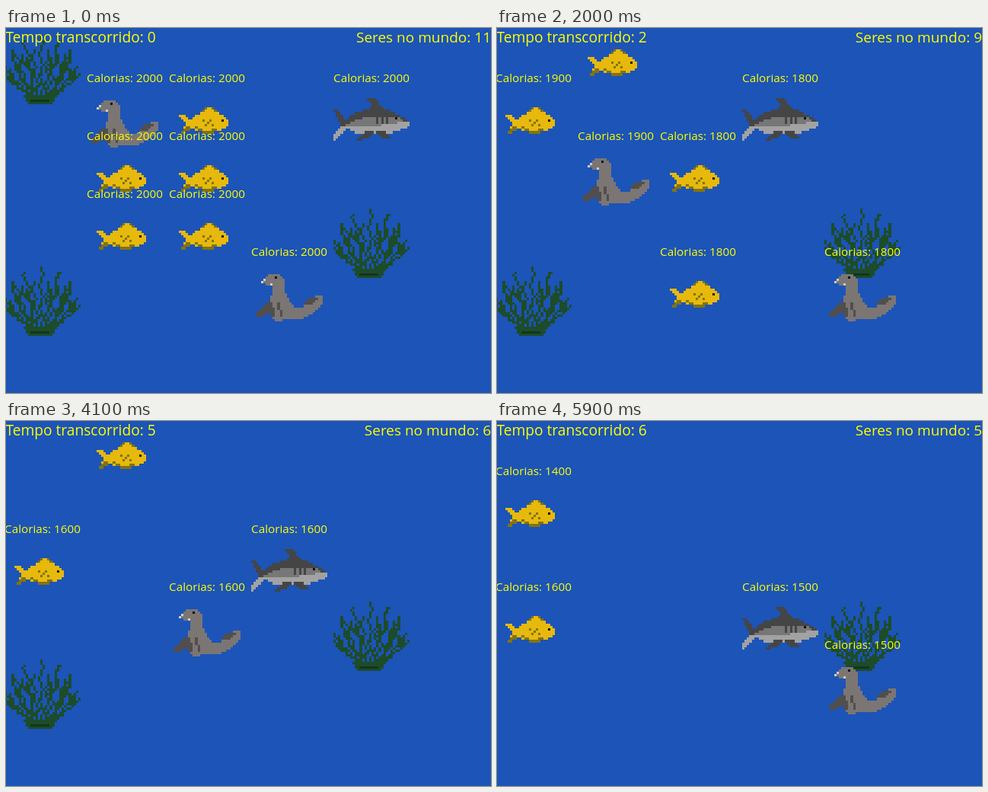
An HTML page with a canvas that plays this animation: 637x479 px, repeating every 6000 ms.

```html
<!DOCTYPE html>
<html lang="pt">
<head>
<meta charset="utf-8">
<title>Mundo marinho</title>
<style>
  html, body { margin: 0; width: 100%; height: 100%; overflow: hidden; background: #1c54b8; }
  canvas { display: block; }
</style>
</head>
<body>
<canvas id="stage" width="637" height="479"></canvas>
<script>
const ctx = document.getElementById('stage').getContext('2d');
const GRID = 32, SIZE = 100, COL = 108, ROW = 76;
const TICK = 100, TICKS = 60, TICKS_PER_STEP = 2;

// Rasterises [colour, path, lineWidth?] layers onto a coarse pixel grid.
function sprite(...layers) {
  const canvas = document.createElement('canvas');
  canvas.width = canvas.height = GRID;
  const g = canvas.getContext('2d');
  for (const [colour, d, width] of layers) {
    const path = new Path2D(d);
    g.fillStyle = colour;
    g.lineWidth = width || 1;
    for (let y = 0; y < GRID; y++) for (let x = 0; x < GRID; x++) {
      const inside = width ? g.isPointInStroke(path, x + .5, y + .5)
                           : g.isPointInPath(path, x + .5, y + .5);
      if (inside) g.fillRect(x, y, 1, 1);
    }
  }
  return canvas;
}

const dot = (x, y, h = 1) => `M${x} ${y}h1v${h}h-1z`;
const repeat = (n, f) => Array.from({ length: n }, (_, i) => f(i)).join('');

// Stems fan out from the base, sway, and carry a short twig.
function stem(i, count) {
  const angle = Math.PI * (.05 + .9 * i / (count - 1));
  const reach = i % 2 ? .78 : 1;
  const root = 15.5 - 5 * Math.cos(angle);
  const point = s => [
    root - 11 * Math.cos(angle) * s ** .75 + .8 * Math.sin(s * 17 + i * 2),
    28 - 25 * s * reach * Math.sin(angle) ** .55
  ];
  const line = repeat(11, k => `${k ? 'L' : 'M'}${point(k / 10)}`);
  const side = angle < Math.PI / 2 ? -1 : 1;
  return `${line}M${point(.5)}l${2 * side} -2v-3`;
}

const GOLD = '#e6b90c', OLIVE = '#827313', GREY = '#7b7674', SHADE = '#514e4d', STEEL = '#454545', PALE = '#a2a2a2';
const sprites = {
  weed: sprite(
    ['#1d4c29', repeat(13, i => stem(i, 13)), 1],
    ['#1d4c29', 'M8 28H22L20 32H10z'],
    ['#12351f', 'M11 30.5H19', 1]),
  fish: sprite(
    [GOLD, 'M4 12H7L9 15V17L8 19 5 20 7 16z'],
    [OLIVE, 'M9 16V18L8 19 5 20 7 17z'],
    [OLIVE, 'M13 12 15 9H19L21 12zM14 18H20L19 20H16z'],
    [GOLD, 'M8 15Q16 7 25 14V17Q16 22 8 17zM15 11 16 9H18L19 11z'],
    [OLIVE, repeat(5, i => dot(14 + i, 14 + i * 2 % 3)) + 'M11 17Q15 20 20 18V19Q15 21 11 18z'],
    ['#111', dot(22, 14)]),
  seal: sprite(
    [GREY, 'M7 6H12Q14 8 14 12 16 20 20 20 23 20 25 16L30 15V18Q25 25 18 25H13V26H10Q6 19 9 14V11H7L5 9z'],
    [SHADE, 'M2 24V23L6 18H9V21L4 24zM22 19 25 16H28L27 18 24 19z'],
    [SHADE, 'M9 20V24M11 18 13 24', 1],
    ['#d0cccb', dot(4, 9) + dot(5, 8) + dot(8, 10)],
    ['#111', dot(10, 7)]),
  shark: sprite(
    [STEEL, 'M3 16Q8 10 16 10H23Q28 12 32 15V17H4zM14 5H18Q20 9 23 11H13L16 9 16 7zM0 10H2L5 15 3 16z'],
    ['#777', 'M4 17Q10 13 16 13H28L30 16 18 18H6z'],
    [PALE, 'M4 17H18L23 16 32 15V17L24 20H10zM0 23V21L4 17 6 18 3 20z'],
    [STEEL, 'M13 19H17L14 22 10 23zM18 19H22L24 22H21z' + repeat(3, i => dot(18 + 2 * i, 13, 3))],
    ['#111', dot(26, 13)])
};

// A route lists "tick:column-row" goals; a being sets off at that tick.
const world = [
  ['weed', '0:00'], ['weed', '0:43'], ['weed', '0:04'],
  ['shark', '0:41 7:31 20:41 34:42 39:32 46:33'],
  ['seal', '0:11 7:12 20:14 34:24 39:23 46:34 53:44'],
  ['seal', '0:34 10:44 20:42'],
  ['fish', '0:13 3:01 10:00 12:01 39:02 53:04 57:03'],
  ['fish', '0:21 14:10 41:00 53:01'],
  ['fish', '0:12'], ['fish', '0:22 20:42'], ['fish', '0:23 9:24 27:42']
];
const prey = { shark: 'seal', seal: 'fish', fish: 'weed' };

function createBeing([kind, route]) {
  const goals = route.split(' ').map(goal => {
    const [start, cell] = goal.split(':');
    return { start: +start, col: +cell[0], row: +cell[1] };
  });
  return { kind, goals, col: goals[0].col, row: goals[0].row, meals: 0 };
}

function step(being, tick) {
  const goal = being.goals.filter(g => g.start < tick).pop();
  if (!goal || (tick - goal.start) % TICKS_PER_STEP) return;
  being.col += Math.sign(goal.col - being.col);
  being.row += Math.sign(goal.row - being.row);
}

// Beings walk one cell per step and eat any prey they land on.
function simulate() {
  let alive = world.map(createBeing);
  return Array.from({ length: TICKS }, (_, tick) => {
    alive.forEach(being => step(being, tick));
    for (const hunter of alive) {
      const eaten = alive.filter(b => b.kind === prey[hunter.kind] && b.col === hunter.col && b.row === hunter.row);
      hunter.meals += eaten.length;
      alive = alive.filter(b => !eaten.includes(b));
    }
    return alive.map(being => ({ ...being })).sort((a, b) => a.row - b.row || a.col - b.col);
  });
}
const history = simulate();

function write(text, x, y, size, align) {
  ctx.font = `${size}px "Open Sans", "Noto Sans", sans-serif`;
  ctx.textAlign = align;
  ctx.fillStyle = '#ff0';
  ctx.fillText(text, x, y);
}

function draw(now) {
  const tick = Math.floor(now / TICK) % TICKS;
  const seconds = Math.ceil(tick / 10);
  const alive = history[tick];

  ctx.fillStyle = '#1c54b8';
  ctx.fillRect(0, 0, 637, 479);
  ctx.imageSmoothingEnabled = false;
  for (const { kind, col, row, meals } of alive) {
    ctx.drawImage(sprites[kind], col * COL - 2, row * ROW, SIZE, SIZE);
    if (kind !== 'weed') {
      write(`Calorias: ${2000 + 100 * (meals - seconds)}`, col * COL + 48, row * ROW - 5, 15.25, 'center');
    }
  }
  write(`Tempo transcorrido: ${seconds}`, -.5, 19, 19.15, 'left');
  write(`Seres no mundo: ${alive.length}`, 637, 19, 19, 'right');
  requestAnimationFrame(draw);
}
draw(0);
</script>
</body>
</html>
```
